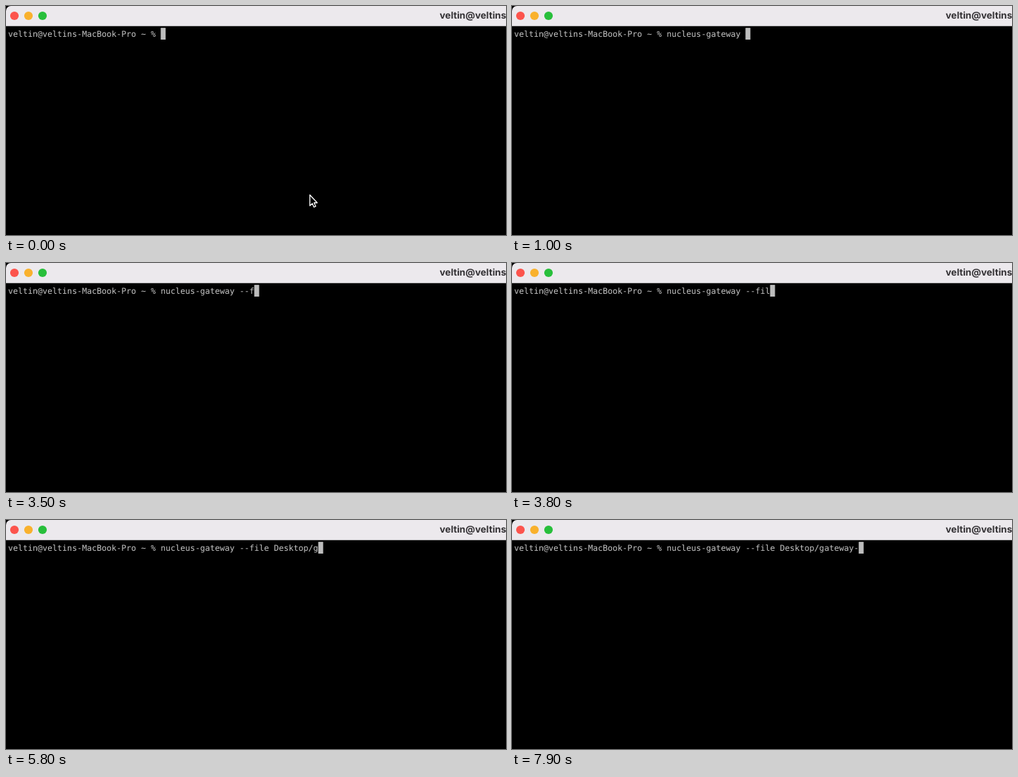
An HTML page with a canvas for the animation above (8 s loop, 712x327 px).

```html
<!DOCTYPE html>
<html lang="en">
<head>
<meta charset="utf-8">
<title>Terminal</title>
<style>
  html, body { margin: 0; width: 100%; height: 100%; overflow: hidden; background: #000; }
  canvas { display: block; }
</style>
</head>
<body>
<canvas id="stage" width="712" height="327"></canvas>
<script>
const ctx = document.getElementById('stage').getContext('2d');
const LOOP = 8000, KEY_DELAY = 100;
const LEFT = 3, CELL = 7.01, BASELINE = 44;
const HOST = 'veltin@veltins-MacBook-Pro';

// Bursts of typing: start time, keys pressed, text then filled in by tab completion
const BURSTS = [
  [500, 'nucl'],
  [900, '', 'eus-gateway '],
  [2700, '-'],
  [2900, '-'],
  [3500, 'fi'],
  [3800, 'le '],
  [4700, 'D'],
  [4900, 'es', 'ktop/'],
  [5800, 'gat'],
  [6700, 'e'],
  [6900, 'w'],
  [7100, '', 'ay'],
  [7900, '-']
];

function typedAt(time) {
  let text = '';
  for (const [start, keys, completion = ''] of BURSTS) {
    const pressed = Math.floor((time - start) / KEY_DELAY) + 1;
    if (pressed < 1) break;
    text += keys.slice(0, pressed);
    if (pressed > keys.length) text += completion;
  }
  return text;
}

function drawWindow() {
  ctx.fillStyle = '#000';
  ctx.fillRect(0, 0, 712, 327);

  ctx.fillStyle = '#ece9ed';
  ctx.beginPath();
  ctx.roundRect(0, 0, 720, 28, [7, 0, 0, 0]);
  ctx.fill();
  ctx.fillStyle = '#aeacaf';
  ctx.fillRect(0, 28, 712, 1);

  ['#fc544d', '#f9b12d', '#28bf3b'].forEach((color, i) => {
    ctx.fillStyle = color;
    ctx.beginPath();
    ctx.arc(12 + 20 * i, 14, 6.1, 0, 7);
    ctx.fill();
  });

  ctx.fillStyle = '#343235';
  ctx.font = '700 13.5px Inter, sans-serif';
  ctx.fillText(HOST, 617.5, 18.2);
}

function drawLine(text) {
  ctx.font = '11.65px "DejaVu Sans Mono", monospace';
  ctx.fillStyle = '#c6c6c6';
  [...text].forEach((char, i) => ctx.fillText(char, LEFT + i * CELL, BASELINE));
  ctx.fillStyle = '#bdbdbd';
  ctx.fillRect(LEFT + text.length * CELL, 31.2, CELL, 16.8);
}

function drawPointer() {
  const arrow = new Path2D('M432.7 269.7V285.2L436.2 282L438.5 287.2L441 286.1L438.7 281H443.2Z');
  ctx.fillStyle = '#000';
  ctx.fill(arrow);
  ctx.strokeStyle = '#fff';
  ctx.lineWidth = 1.3;
  ctx.lineJoin = 'round';
  ctx.stroke(arrow);
}

function frame(now) {
  const typed = typedAt(now % LOOP);
  drawWindow();
  drawLine(HOST + ' ~ % ' + typed);
  if (!typed) drawPointer();
  requestAnimationFrame(frame);
}

ctx.textRendering = 'geometricPrecision';
requestAnimationFrame(frame);
</script>
</body>
</html>
```
